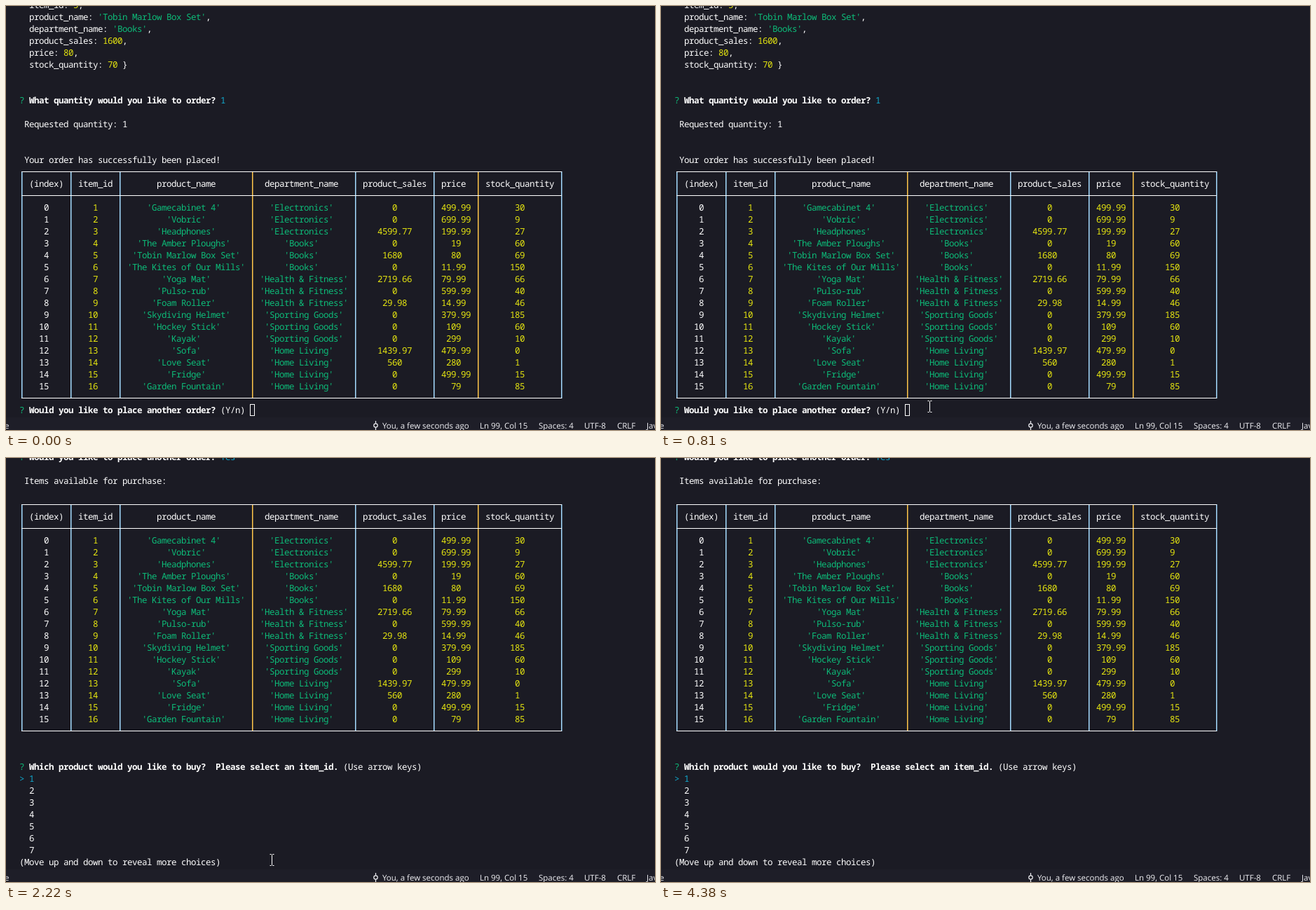
Write an HTML page that moves like this. It is 926 px wide and 605 px high and loops after 5010 ms.

```html
<!DOCTYPE html>
<html lang="en">
<head>
<meta charset="utf-8">
<title>Store terminal</title>
<style>
  html, body { margin: 0; width: 100%; height: 100%; overflow: hidden; background: #1b1b24; }
  svg { display: block; }
  text { white-space: pre; text-rendering: geometricPrecision; }
  .term text { font: 12.5px "Noto Sans Mono", "DejaVu Sans Mono", monospace; }
  .term .bold { font-weight: 700; }
  .status text { font: 11.5px "Open Sans", "Noto Sans", sans-serif; fill: #f0f0f4; }
</style>
</head>
<body>
<svg id="stage" width="926" height="605" viewBox="0 0 926 605">
  <rect width="926" height="605" fill="#1b1b24"/>
  <g id="term" class="term"></g>
  <g id="status" class="status">
    <rect y="587" width="926" height="18" fill="#1e1e28"/>
    <g fill="none" stroke="#f0f0f4" stroke-width="1.2">
      <circle cx="527.5" cy="598.5" r="2.7"/>
      <path d="M527.5 592v3.8M527.5 601.2v3.8"/>
    </g>
  </g>
  <g id="mouse" fill="none" stroke="#fff">
    <path d="M-3-8H-1L0-7L1-8H3M0-7V7M-3 8H-1L0 7L1 8H3"/>
  </g>
</svg>
<script>
const LOOP = 5010;
const CELL = 7, ROW = 17, LEFT = 19, TOP = 7;
const WHITE = '#ffffff', GREEN = '#0dbc79', YELLOW = '#e5e510', CYAN = '#11a8cd';
const EDGE_BLUE = '#a5dcff', EDGE_GOLD = '#ffc64a';

const byId = id => document.getElementById(id);
const term = byId('term'), mouse = byId('mouse');

function add(parent, tag, attrs = {}, text) {
  const el = document.createElementNS('http://www.w3.org/2000/svg', tag);
  for (const key in attrs) el.setAttribute(key, attrs[key]);
  if (text !== undefined) el.textContent = text;
  parent.appendChild(el);
  return el;
}

const colX = col => LEFT + CELL * col;
const rowY = row => TOP + ROW * row;
const show = (el, on) => el.setAttribute('visibility', on ? 'visible' : 'hidden');

// Fit the font's advance to the terminal cell.
const probe = add(term, 'text', {}, '0'.repeat(50));
const spacing = CELL - probe.getComputedTextLength() / 50;
probe.remove();
term.style.letterSpacing = spacing + 'px';

// Each part is [text, colour, bold].
function line(parent, row, col, ...parts) {
  const el = add(parent, 'text', { x: colX(col), y: rowY(row) + 13 });
  for (const [text, fill = WHITE, bold] of parts)
    add(el, 'tspan', { fill, class: bold ? 'bold' : '' }, text);
  return el;
}

const HEADS = ['(index)', 'item_id', 'product_name', 'department_name',
  'product_sales', 'price', 'stock_quantity'];
const WIDTHS = [9, 9, 26, 20, 15, 8, 16];
const DEPARTMENTS = ['Electronics', 'Books', 'Health & Fitness', 'Sporting Goods', 'Home Living'];
const PRODUCTS = `Gamecabinet 4|0|499.99|30
Vobric|0|699.99|9
Headphones|4599.77|199.99|27
The Amber Ploughs|0|19|60
Tobin Marlow Box Set|1680|80|69
The Kites of Our Mills|0|11.99|150
Yoga Mat|2719.66|79.99|66
Pulso-rub|0|599.99|40
Foam Roller|29.98|14.99|46
Skydiving Helmet|0|379.99|185
Hockey Stick|0|109|60
Kayak|0|299|10
Sofa|1439.97|479.99|0
Love Seat|560|280|1
Fridge|0|499.99|15
Garden Fountain|0|79|85`.split('\n').map(s => s.split('|'));

const quote = s => `'${s}'`;

function table(parent, row) {
  const edges = [0];
  for (const w of WIDTHS) edges.push(edges[edges.length - 1] + w + 1);

  const cells = (r, values, colours) => values.forEach((value, i) => {
    const pad = Math.floor((WIDTHS[i] - value.length) / 2);
    line(parent, r, edges[i] + 1 + pad, [value, colours[i]]);
  });

  const last = row + 3 + PRODUCTS.length;
  edges.forEach((col, i) => add(parent, 'rect', {
    x: colX(col) + 3, y: rowY(row) + 8, width: 1.5, height: (last - row) * ROW + 1,
    fill: i === 3 || i === 6 ? EDGE_GOLD : EDGE_BLUE
  }));
  for (const r of [row, row + 2, last])
    add(parent, 'rect', { x: colX(0) + 3, y: rowY(r) + 8, width: CELL * 110 + 1, height: 1, fill: WHITE });

  cells(row + 1, HEADS, []);
  PRODUCTS.forEach(([name, sales, price, stock], i) => {
    const dept = DEPARTMENTS[Math.min(4, Math.floor(i / 3))];
    cells(row + 3 + i,
      [String(i), String(i + 1), quote(name), quote(dept), sales, price, stock],
      [WHITE, YELLOW, GREEN, GREEN, YELLOW, YELLOW, YELLOW]);
  });
}

// One long scrollback, moved up in whole rows.
const buffer = add(term, 'g');
const field = (row, key, value, colour, end = ',') =>
  line(buffer, row, 2, [key + ': '], [value, colour], [end]);
const ask = (parent, row, text) => line(parent, row, 0, ['? ', GREEN], [text, WHITE, true]);

field(-1, 'item_id', '5', YELLOW);
field(0, 'product_name', quote(PRODUCTS[4][0]), GREEN);
field(1, 'department_name', quote('Books'), GREEN);
field(2, 'product_sales', '1600', YELLOW);
field(3, 'price', '80', YELLOW);
field(4, 'stock_quantity', '70', YELLOW, ' }');
ask(buffer, 7, 'What quantity would you like to order?');
line(buffer, 7, 41, ['1', CYAN]);
line(buffer, 9, 1, ['Requested quantity: 1']);
line(buffer, 12, 1, ['Your order has successfully been placed!']);
table(buffer, 13);

ask(buffer, 33, 'Would you like to place another order?');
const hint = line(buffer, 33, 41, ['(Y/n)']);
const typed = line(buffer, 33, 47, ['y']);
const answer = line(buffer, 33, 41, ['Yes', CYAN]);
line(buffer, 35, 1, ['Items available for purchase:']);
table(buffer, 37);

const choices = add(buffer, 'g');
ask(choices, 59, 'Which product would you like to buy?  Please select an item_id.');
line(choices, 59, 66, ['(Use arrow keys)']);
line(choices, 60, 0, ['> 1', CYAN]);
for (let n = 2; n <= 7; n++) line(choices, 59 + n, 2, [String(n)]);
line(choices, 67, 0, ['(Move up and down to reveal more choices)']);

const caret = add(term, 'rect', { y: rowY(33) + 0.5, width: 6, height: 16, stroke: WHITE });

const status = byId('status');
[[-2, 'e'], [537, 'You, a few seconds ago'], [676, 'Ln 99, Col 15'], [760, 'Spaces: 4'],
 [825, 'UTF-8'], [872, 'CRLF'], [914, 'JavaScript']]
  .forEach(([x, text]) => add(status, 'text', { x, y: 603 }, text));

// Pointer moves: start time, step length, then [step, x, y] points.
const MOVES = [
  { start: 130, step: 32, path: [[0, 797, 600], [6, 481, 560], [9, 424, 551], [15, 387, 568]] },
  { start: 710, step: 50, path: [[0, 386, 569], [4, 379, 573]] },
  { start: 4170, step: 30, path: [[0, 416, 572], [3, 622, 583], [6, 858, 600]] }
];

function pointAt(path, n) {
  for (let i = 1; i < path.length; i++) {
    const [a, ax, ay] = path[i - 1], [b, bx, by] = path[i];
    if (n <= b) {
      const k = (n - a) / (b - a);
      return [Math.round(ax + (bx - ax) * k), Math.round(ay + (by - ay) * k)];
    }
  }
  return path[path.length - 1].slice(1);
}

function render(t) {
  const scroll = t < 2200 ? 0 : t < 2220 ? 26 : 34;
  buffer.setAttribute('transform', `translate(0 ${-ROW * scroll})`);
  show(hint, t < 2200);
  show(typed, t >= 1510 && t < 2200);
  show(answer, t >= 2200);
  show(choices, t >= 2220);

  const col = t < 1510 ? 47 : t < 2200 ? 48 : 0;
  caret.setAttribute('x', colX(col) + 0.5);
  caret.setAttribute('fill', t < 910 ? 'none' : WHITE);
  show(caret, t < 2220);

  const move = MOVES.filter(m => t >= m.start).pop();
  show(mouse, move && t < 4380);
  if (move) {
    const [x, y] = pointAt(move.path, Math.floor((t - move.start) / move.step));
    mouse.setAttribute('transform', `translate(${x + 0.5} ${y + 0.5})`);
  }
}

const begin = performance.now();
function tick() {
  render((performance.now() - begin) % LOOP);
  requestAnimationFrame(tick);
}
tick();
</script>
</body>
</html>
```
